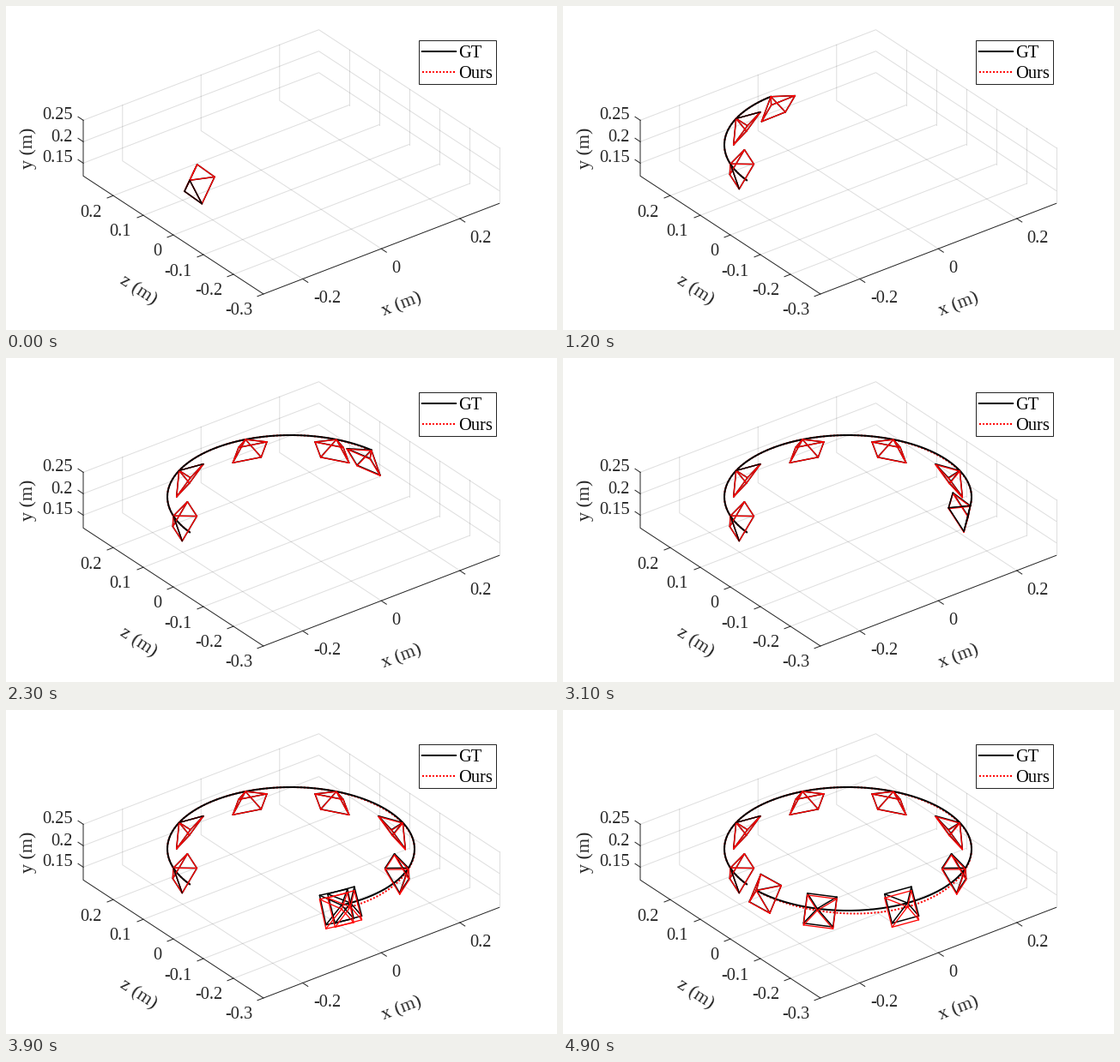
A matplotlib script for the animation above (5 s loop, 642 by 378 pixels).

```python
import numpy as np
import matplotlib.pyplot as plt
from matplotlib.animation import FuncAnimation
from matplotlib.collections import LineCollection
from matplotlib.patches import Rectangle

W, H, DPI = 642, 378, 100
FRAMES, INTERVAL = 50, 100
PT = 72 / DPI                       # points per pixel
INK = "#262626"
START, STEP = 145.0, 7.2            # orbit angle in degrees
KEY_ANGLES = 162 + 43.2 * np.arange(8)

plt.rcParams["font.family"] = "Liberation Serif"
fig = plt.figure(figsize=(W / DPI, H / DPI), dpi=DPI, facecolor="white")
ax = fig.add_axes([0, 0, 1, 1])
ax.set_xlim(0, W)
ax.set_ylim(H, 0)
ax.axis("off")

# Orthographic view: screen vectors of one metre along x, z and y
FRONT = np.array([300, 336])
X_DIR = np.array([457.5, -176])
Z_DIR = np.array([-350, -229.5])
Y_DIR = np.array([0, -500])
LO, HI, FLOOR, CEIL = -0.3, 0.3, 0.12, 0.25


def project(x, y, z):
    return FRONT + (x - LO) * X_DIR + (z - LO) * Z_DIR + (y - FLOOR) * Y_DIR


def stroke(points, color=INK, width=1.0, **kw):
    xs, ys = np.transpose(points)
    return ax.plot(xs, ys, color=color, lw=width * PT, **kw)[0]


def label(x, y, text, size=20.4, ha="center", **kw):
    ax.text(x, y, text, fontsize=size * PT, ha=ha, va="baseline",
            color=kw.pop("color", INK), **kw)


def draw_axes():
    x_ticks = [-0.2, 0, 0.2]
    y_ticks = [0.15, 0.2, 0.25]
    z_ticks = [0.2, 0.1, 0, -0.1, -0.2, -0.3]
    grid = dict(color=(0.15, 0.15, 0.15, 0.15), zorder=1)
    for x in x_ticks:
        stroke([project(x, FLOOR, LO), project(x, FLOOR, HI), project(x, CEIL, HI)], **grid)
    for z in z_ticks:
        if z > LO:
            stroke([project(LO, FLOOR, z), project(HI, FLOOR, z)], **grid)
        stroke([project(HI, FLOOR, z), project(HI, CEIL, z)], **grid)
    for y in y_ticks:
        stroke([project(LO, y, HI), project(HI, y, HI), project(HI, y, LO)], **grid)

    stroke([project(LO, CEIL, HI), project(LO, FLOOR, HI),
            project(LO, FLOOR, LO), project(HI, FLOOR, LO)], zorder=2)

    def tick(point, offset):
        stroke([point, point + offset], zorder=2)

    for x, pos in zip(x_ticks, [(374, 346), (454, 311), (553, 276)]):
        tick(project(x, FLOOR, LO), (6, 4))
        label(*pos, f"{x:g}")
    z_pos = [(98.5, 246), (133, 268), (176, 291), (200, 315), (236, 337), (271, 360)]
    for z, pos in zip(z_ticks, z_pos):
        tick(project(LO, FLOOR, z), (-7, 2.7))
        label(*pos, f"{z:g}")
    for y, base in zip(y_ticks, [182.5, 157.5, 132.5]):
        tick(project(LO, y, HI), (-6, -4))
        label(78, base, f"{y:g}", ha="right")

    turned = dict(size=22, rotation_mode="anchor")
    label(31, 166, "y (m)", rotation=90, **turned)
    label(151, 336.5, "z (m)", rotation=-33, **turned)
    label(463, 353, "x (m)", rotation=21, **turned)


DOTS = (0, (1, 1))


def draw_legend():
    ax.add_patch(Rectangle((480.5, 39.5), 90, 51, fc="white", ec=INK, lw=PT, zorder=8))
    stroke([(485, 52.5), (524, 52.5)], "black", 2, zorder=9)
    stroke([(485, 77), (524, 77)], "red", 2, zorder=9, ls=DOTS, dash_capstyle="butt")
    label(527, 60, "GT", ha="left", color="black", zorder=9)
    label(527, 84, "Ours", ha="left", color="black", zorder=9)


def orbit(deg):
    a = np.radians(deg)
    return np.stack([332 + 144 * np.cos(a), 162 + 72 * np.sin(a)], axis=-1)


def drift(deg):
    """Downward error of the estimate, in pixels."""
    return (4.6 * np.exp(-((deg - 425) / 45) ** 2)
            + 0.9 * np.exp(-((deg - 322) / 25) ** 2))


def estimate(deg):
    path = orbit(deg)
    path[..., 1] += drift(deg)
    return path


def frustum(deg, apex):
    """Eight edges: four sides of the image plane, then four rays."""
    a = np.radians(deg)
    inward = np.array([-np.cos(a), -np.sin(a) / 2])
    side = 17.75 * np.array([-np.sin(a), np.cos(a) / 2])
    up = 9 * inward + np.array([0, -13.1])
    center = apex + 14 * inward + np.array([0, 8.5])
    corners = [center + side + up, center - side + up,
               center - side - up, center + side - up]
    sides = [(corners[i], corners[(i + 1) % 4]) for i in range(4)]
    return sides + [(apex, c) for c in corners]


def front_edges(deg):
    """Edges where the true camera hides the estimated one."""
    if deg < 155:
        return [2, 6, 7]
    if deg < 170:
        return [6]
    if deg < 215:
        return [4]
    if 355 < deg < 375:
        return [0, 2, 3, 4, 6, 7]
    return []


def edge_layer(color, width, z):
    layer = LineCollection([], colors=color, linewidths=width * PT, zorder=z,
                           capstyle="round")
    return ax.add_collection(layer, autolim=False)


draw_axes()
draw_legend()
our_path = stroke([(0, 0)], "red", 2, zorder=3, ls=DOTS, dash_capstyle="butt")
true_path = stroke([(0, 0)], "black", 2, zorder=4)
true_edges = edge_layer("black", 1.5, 5)
our_edges = edge_layer("red", 1.3, 6)
top_edges = edge_layer("black", 1.3, 7)


def update(frame):
    now = START + STEP * frame
    sweep = np.linspace(START, now, 8 * frame + 2)
    true_path.set_data(*orbit(sweep).T)
    our_path.set_data(*estimate(sweep).T)

    true, ours, top = [], [], []
    for deg in [*KEY_ANGLES[KEY_ANGLES <= now], now]:
        edges = frustum(deg, orbit(deg))
        true += edges
        ours += frustum(deg, estimate(deg))
        top += [edges[i] for i in front_edges(deg)]
    true_edges.set_segments(true)
    our_edges.set_segments(ours)
    top_edges.set_segments(top)
    return our_path, true_path, true_edges, our_edges, top_edges


anim = FuncAnimation(fig, update, frames=FRAMES, interval=INTERVAL,
                     repeat=True, repeat_delay=0, blit=False)
plt.show()
```
